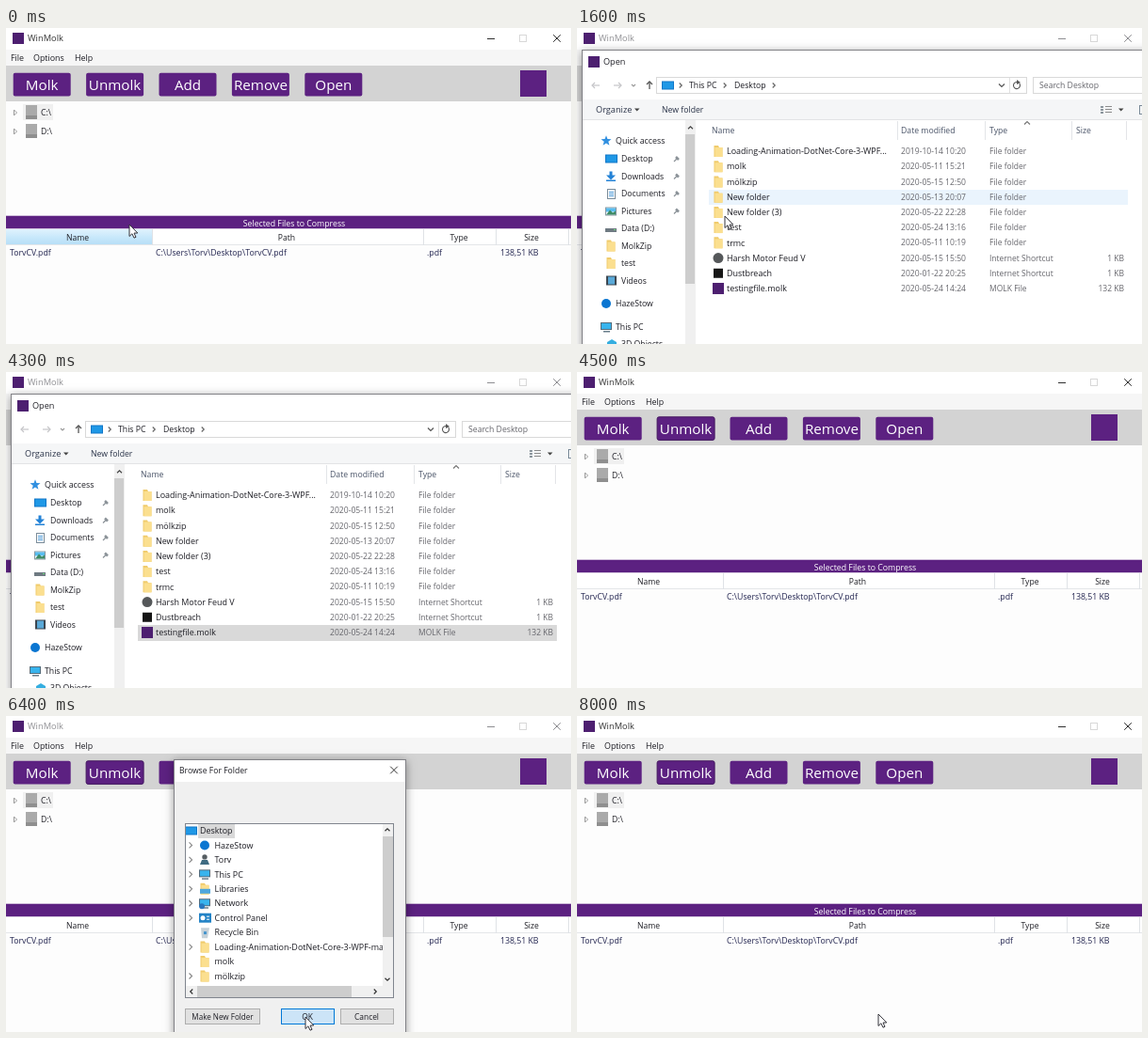
Recreate the animation shown at these times as an HTML page with a canvas. Size 600 px wide and 336 px high, loop 8.1 s.

```html
<!DOCTYPE html>
<html lang="en">
<head>
<meta charset="utf-8">
<title>Archive tool</title>
<style>
html, body { margin: 0; width: 100%; height: 100%; overflow: hidden; background: #fff; }
canvas { display: block; width: 600px; height: 336px; }
</style>
</head>
<body>
<canvas id="stage" width="600" height="336"></canvas>
<script>
const g = document.getElementById('stage').getContext('2d');
const LOOP = 8100, STEP = 100;
const PURPLE = '#5c2181', INK = '#1d1d24', NAVY = '#2a3348', GREY = '#66666c';
const T = { openIn: 900, select: 2300, blur: 3900, openOut: 4400, browseIn: 4700, press: 6300, browseOut: 6700 };

// time, x, y of the pointer tip
const PATH = [
  [0, 131, 209], [200, 127, 150], [500, 116, 64], [1200, 116, 64], [1300, 120, 75],
  [1600, 157, 200], [1800, 184, 248], [2100, 205, 278], [2800, 206, 281], [3000, 215, 285],
  [3500, 440, 350], [4900, 440, 350], [5300, 414, 323], [5800, 330, 321], [6000, 318, 320],
  [6800, 318, 320], [7200, 320, 317], [8100, 320, 317]
];

function pointer(t) {
  if (t <= 0) return { x: PATH[0][1], y: PATH[0][2] };
  const i = PATH.findIndex(p => p[0] > t);
  const [a, b] = [PATH[i - 1], PATH[i]];
  const u = (t - a[0]) / (b[0] - a[0]);
  return { x: a[1] + (b[1] - a[1]) * u, y: a[2] + (b[2] - a[2]) * u };
}

function box(x, y, w, h, fill, edge) {
  if (fill) { g.fillStyle = fill; g.fillRect(x, y, w, h); }
  if (edge) { g.strokeStyle = edge; g.lineWidth = 1; g.strokeRect(x + .5, y + .5, w - 1, h - 1); }
}

// dialog body with a soft drop shadow
function panel(x, y, w, h, fill) {
  g.save();
  g.shadowColor = 'rgba(0,0,0,.4)';
  g.shadowBlur = 9;
  g.shadowOffsetY = 2;
  box(x, y, w, h, fill);
  g.restore();
  box(x, y, w, h, null, '#828287');
}

function disc(x, y, r, fill) {
  g.fillStyle = fill;
  g.beginPath(); g.arc(x, y, r, 0, 7); g.fill();
}

function line(color, width, ...pts) {
  g.strokeStyle = color; g.lineWidth = width;
  g.beginPath();
  for (let i = 0; i < pts.length; i += 2) g.lineTo(pts[i], pts[i + 1]);
  g.stroke();
}

function poly(fill, ...pts) {
  g.fillStyle = fill;
  g.beginPath();
  for (let i = 0; i < pts.length; i += 2) g.lineTo(pts[i], pts[i + 1]);
  g.fill();
}

// y is the middle of the capitals
function text(s, x, y, color = INK, size = 8.7, align = 'left') {
  g.font = size + 'px "Open Sans", "Noto Sans", sans-serif';
  g.textAlign = align;
  g.fillStyle = color;
  g.fillText(s, x, y + size * .36);
}

function chevron(x, y, dir, color = '#666', r = 2.5) {
  const [dx, dy] = { right: [1, 0], left: [-1, 0], up: [0, -1], down: [0, 1] }[dir];
  const k = r / 2;
  line(color, 1.2, x - dx * k + dy * r, y - dy * k + dx * r, x + dx * k, y + dy * k, x - dx * k - dy * r, y - dy * k - dx * r);
}

function cross(x, y, r, color) {
  line(color, 1, x - r, y - r, x + r, y + r);
  line(color, 1, x + r, y - r, x - r, y + r);
}

const icons = {
  folder(x, y) {
    poly('#f0cb6c', x - 4.5, y - 6, x, y - 6, x + 1, y - 4, x + 4.5, y - 4, x + 4.5, y + 6, x - 4.5, y + 6);
    box(x - 3.5, y - 4, 8, 10, '#fbdf8f');
  },
  screen(x, y) {
    box(x - 6, y - 4.5, 13, 9, '#1277c8');
    box(x - 5, y - 3.5, 11, 7, '#1f98e6');
  },
  pc(x, y) {
    box(x - 6, y - 5, 12, 8, '#526b7b');
    box(x - 5, y - 4, 10, 6, '#38b4ed');
    box(x - 3, y + 4, 7, 1.5, '#6a7f8c');
  },
  star(x, y) {
    g.fillStyle = '#2f8fe0';
    g.beginPath();
    for (let i = 0; i < 10; i++) {
      const r = i % 2 ? 2.4 : 5.8, a = i * Math.PI / 5 - Math.PI / 2;
      g.lineTo(x + r * Math.cos(a), y + r * Math.sin(a));
    }
    g.fill();
  },
  down(x, y) {
    box(x - 1.5, y - 5, 3, 5, '#2382d6');
    poly('#2382d6', x - 5, y - 1, x + 5, y - 1, x, y + 4);
    box(x - 5, y + 4, 10, 1.5, '#2382d6');
  },
  page(x, y) {
    box(x - 4, y - 5, 9, 11, '#fff', '#7b8c99');
    for (let i = 0; i < 3; i++) box(x - 2, y - 2 + i * 2, 5, 1, '#4c9ad8');
  },
  picture(x, y) {
    box(x - 6, y - 4, 12, 9, '#fff', '#8395a0');
    box(x - 5, y - 3, 10, 4, '#58bdf0');
    poly('#3c8a65', x - 5, y + 4, x - 1, y - 1, x + 2, y + 2, x + 5, y, x + 5, y + 4);
  },
  drive(x, y) {
    box(x - 6, y, 12, 4, '#6f7a82');
    box(x + 3, y + 1, 2, 1, '#6fdc7d');
  },
  film(x, y) {
    box(x - 5, y - 5, 11, 10, '#3d4750');
    box(x - 3, y - 4, 7, 8, '#5aa9d8');
  },
  cube(x, y) {
    poly('#35aee0', x, y - 5, x + 5, y - 2, x + 5, y + 4, x, y + 6, x - 5, y + 4, x - 5, y - 2);
  },
  cloud(x, y) { disc(x, y, 5, '#0b76d1'); },
  user(x, y) {
    disc(x, y - 3, 2.7, '#555d62');
    poly('#3f6b82', x - 5, y + 5, x - 3, y, x + 3, y, x + 5, y + 5);
  },
  shelf(x, y) {
    icons.folder(x, y);
    box(x - 5, y, 11, 5, '#4ea7dc');
  },
  network(x, y) {
    icons.pc(x, y);
    disc(x - 3, y + 3, 3, '#2877be');
  },
  panel(x, y) {
    box(x - 6, y - 5, 13, 10, '#2383c6');
    disc(x - 2, y, 2.5, '#fff');
    box(x + 2, y - 2, 3, 1, '#fff');
    box(x + 2, y + 1, 3, 1, '#fff');
  },
  bin(x, y) {
    poly('#c6d1d8', x - 4, y - 5, x + 5, y - 5, x + 3, y + 6, x - 3, y + 6);
    box(x - 1, y - 1, 3, 3, '#4394cd');
  },
  app(x, y) { box(x - 6, y - 6, 12, 12, '#4d1f70'); },
  grey(x, y) { disc(x, y, 5.5, '#55585a'); },
  black(x, y) { box(x - 5, y - 5, 10, 10, '#161616'); }
};

function pin(x, y) {
  line('#8b9298', 1.2, x - 3, y + 3, x, y);
  line('#8b9298', 2.5, x - 1, y - 2, x + 2, y + 1);
}

function mainWindow(t, active, hover) {
  box(0, 0, 600, 336, '#fdfdfd');
  box(0, 0, 600, 23, '#fff');
  icons.app(13, 11);
  const ink = active ? '#303030' : '#8e8e92';
  text('WinMolk', 23, 11, ink, 9.3);
  box(511, 11, 8, 1, ink);
  box(545, 7, 8, 8, null, '#d8d8d8');
  cross(585, 11, 3.8, ink);

  box(0, 23, 600, 17, '#f6f6f6');
  text('File', 5, 32, INK, 8.9);
  text('Options', 29, 32, INK, 8.9);
  text('Help', 73, 32, INK, 8.9);

  box(0, 40, 600, 38, '#d3d3d3');
  ['Molk', 'Unmolk', 'Add', 'Remove', 'Open'].forEach((label, i) => {
    const x = 7.7 + i * 77.4;
    g.fillStyle = PURPLE;
    g.beginPath(); g.roundRect(x, 47.8, 61, 24.6, 2); g.fill();
    if (i === 1 && t >= 700) {
      g.strokeStyle = '#43175f'; g.lineWidth = 1; g.stroke();
    }
    text(label, x + 30.5, 61, '#fff', 15.2, 'center');
  });
  box(546, 45, 28, 28, PURPLE);

  box(18, 81, 32, 17, '#f0f0f0');
  ['C:\\', 'D:\\'].forEach((name, i) => {
    const y = 90 + i * 20;
    line('#9a9a9a', 1, 8.5, y - 3, 11.5, y, 8.5, y + 3, 8.5, y - 3);
    box(21, y - 8, 12, 15, '#aaa');
    box(21, y + 3, 12, 4, '#8f8f8f');
    text(name, 37, y);
  });

  box(0, 199.7, 600, 13.8, PURPLE);
  text('Selected Files to Compress', 306, 208, '#fff', 8.75, 'center');
  box(0, 213.5, 600, 17.5, '#fff');
  if (hover.y > 205 && hover.y < 232 && hover.x < 155) {
    const shade = g.createLinearGradient(0, 214, 0, 231);
    shade.addColorStop(0, '#e0f2fd');
    shade.addColorStop(.5, '#c8e8fb');
    shade.addColorStop(1, '#b5ddf6');
    box(0, 214, 155, 17, shade);
  }
  box(0, 230, 600, 1, '#e4e6e9');
  for (const x of [155, 443, 520, 597]) box(x, 214, 1, 17, '#dfe2e6');
  [['Name', 76], ['Path', 298], ['Type', 481], ['Size', 558]]
    .forEach(([s, x]) => text(s, x, 223, INK, 8.6, 'center'));
  [['TorvCV.pdf', 4], ['C:\\Users\\Torv\\Desktop\\TorvCV.pdf', 159], ['.pdf', 447], ['138,51 KB', 525]]
    .forEach(([s, x]) => text(s, x, 239, '#232550', 8.75));
}

const PLACES = [
  ['Desktop', 'screen'], ['Downloads', 'down'], ['Documents', 'page'], ['Pictures', 'picture'],
  ['Data (D:)', 'drive'], ['MolkZip', 'folder'], ['test', 'folder'], ['Videos', 'film']
];
const FILES = [
  ['Loading-Animation-DotNet-Core-3-WPF...', '2019-10-14 10:20'],
  ['molk', '2020-05-11 15:21'],
  ['mölkzip', '2020-05-15 12:50'],
  ['New folder', '2020-05-13 20:07'],
  ['New folder (3)', '2020-05-22 22:28'],
  ['test', '2020-05-24 13:16'],
  ['trmc', '2020-05-11 10:19'],
  ['Harsh Motor Feud V', '2020-05-15 15:50', 'Internet Shortcut', '1 KB', 'grey'],
  ['Dustbreach', '2020-01-22 20:25', 'Internet Shortcut', '1 KB', 'black'],
  ['testingfile.molk', '2020-05-24 14:24', 'MOLK File', '132 KB', 'app']
];

function openDialog(t, hover) {
  panel(5, 23, 610, 330, '#fff');
  icons.app(18, 36);
  text('Open', 28, 36, INK, 9.1);

  const arrow = (x, d, c) => {
    line(c, 1.2, x - 4, 61, x + 4, 61);
    line(c, 1.2, x + d, 58, x + d * 4, 61, x + d, 64);
  };
  arrow(20, -1, '#c5c5c8');
  arrow(43, 1, '#c5c5c8');
  chevron(60, 61, 'down', '#999', 2);
  line('#555', 1.3, 77, 65, 77, 57);
  line('#555', 1.3, 74, 60, 77, 57, 80, 60);

  box(84, 52, 394, 18, '#fff', '#d9d9d9');
  icons.screen(96, 61);
  chevron(110, 61, 'right');
  text('This PC', 119, 61);
  chevron(157, 61, 'right');
  text('Desktop', 167, 61);
  chevron(209, 61, 'right');
  chevron(451, 61, 'down', '#555', 3);
  box(459, 53, 1, 16, '#e0e0e0');
  g.strokeStyle = '#555'; g.lineWidth = 1.1;
  g.beginPath(); g.arc(467, 61, 3.5, -.6, 4.8); g.stroke();
  poly('#555', 467, 55, 471, 58, 467, 60);
  box(484, 52, 130, 18, '#fff', '#d9d9d9');
  text('Search Desktop', 491, 61, GREY);

  box(6, 76, 600, 21, '#f5f6f7');
  box(6, 97, 600, 1, '#e2e3e5');
  text('Organize', 20, 87, NAVY, 9.2);
  poly('#444', 61, 85.5, 66.5, 85.5, 63.7, 88.5);
  text('New folder', 90, 87, NAVY);
  for (let i = 0; i < 3; i++) {
    box(556, 83 + i * 3, 3, 2, '#8b959c');
    box(561, 83 + i * 3, 7, 1, '#8b8b8b');
  }
  poly('#444', 575, 85.5, 580.5, 85.5, 577.7, 88.5);
  box(597, 82, 5, 10, null, '#7a8a98');

  icons.star(31, 120);
  text('Quick access', 41, 120, INK, 8.85);
  PLACES.forEach(([name, icon], i) => {
    const y = 139 + i * 18.5;
    icons[icon](36, y);
    text(name, 47, y);
    if (i < 4) pin(106, y);
  });
  icons.cloud(31, 293);
  text('HazeStow', 41, 293);
  icons.pc(31, 318);
  text('This PC', 41, 318);
  icons.cube(37, 336);
  text('3D Objects', 47, 336);
  box(115, 98, 11, 238, '#f0f0f0');
  chevron(120.5, 106, 'up', '#444');
  box(115, 113, 10, 159, '#cdcdcd');

  [['Name', 143], ['Date modified', 344], ['Type', 438], ['Size', 530]]
    .forEach(([s, x]) => text(s, x, 109, '#4a5468'));
  for (const x of [340, 433, 525, 583]) box(x, 99, 1, 20, '#e3e5e8');
  chevron(478, 101, 'up', '#777', 3);

  FILES.forEach(([name, date, type = 'File folder', size, icon = 'folder'], i) => {
    const y = 131 + i * 16.22, top = Math.round(y - 8);
    const over = hover.x > 140 && hover.x < 585 && Math.abs(hover.y - y) < 8.1;
    if (i === 9 && t >= T.blur) box(140, top, 445, 17, '#d9d9d9');
    else if (i === 9 && t >= T.select) box(140, top, 445, 17, '#cce8ff', '#9ad2fb');
    else if (over) box(140, top, 445, 16, '#eaf4fd');
    icons[icon](150, y);
    text(name, 159, y, INK, 8.95);
    text(date, 344, y, GREY, 8.6);
    text(type, 438, y, GREY, 8.5);
    if (size) text(size, 581, y, GREY, 8.5, 'right');
  });
}

const TREE = [
  ['Desktop', 'screen'], ['HazeStow', 'cloud'], ['Torv', 'user'], ['This PC', 'pc'], ['Libraries', 'shelf'],
  ['Network', 'network'], ['Control Panel', 'panel'], ['Recycle Bin', 'bin'],
  ['Loading-Animation-DotNet-Core-3-WPF-master', 'folder'], ['molk', 'folder'], ['mölkzip', 'folder']
];

function browseDialog(t, at) {
  panel(178, 46, 247, 300, '#f0f0f0');
  box(179, 47, 245, 23, '#fff');
  text('Browse For Folder', 184, 58, INK, 8.6);
  cross(412, 57.5, 3.8, '#333');

  box(190, 114, 222, 186, '#fff', '#80858e');
  g.save();
  g.beginPath(); g.rect(191, 115, 209, 172); g.clip();
  box(204, 114, 39, 16, t >= T.press ? '#d9d9d9' : '#cce8ff');
  TREE.forEach(([name, icon], i) => {
    const y = 122 + i * 15.45;
    icons[icon](i ? 211 : 196, y);
    if (i && i !== 7 && i < 9 || i === 10) chevron(196, y, 'right', '#888', 3);
    text(name, i ? 221.5 : 206, y, INK, 8.95);
  });
  g.restore();
  box(400, 115, 11, 172, '#f0f0f0');
  box(400, 128, 11, 107, '#cdcdcd');
  chevron(405, 121, 'up', '#333');
  chevron(405, 280, 'down', '#333');
  box(191, 287, 220, 12, '#f0f0f0');
  box(203, 287, 164, 12, '#cdcdcd');
  chevron(197, 293, 'left', '#333');
  chevron(392, 293, 'right', '#333');

  const over = at.x > 292 && at.x < 349 && at.y > 311 && at.y < 328;
  const held = t >= T.press && t < T.press + 300;
  box(190, 311, 80, 17, '#e1e1e1', '#adadad');
  text('Make New Folder', 230, 320, INK, 8.1, 'center');
  box(292, 311, 57, 17, held ? '#cce4f7' : over ? '#e5f1fb' : '#e1e1e1', '#0078d7');
  if (!over) box(293, 312, 55, 15, null, '#0078d7');
  text('OK', 320, 320, INK, 8.4, 'center');
  box(355, 311, 57, 17, '#e1e1e1', '#adadad');
  text('Cancel', 383, 320, INK, 8.4, 'center');
}

function drawPointer({ x, y }) {
  const pts = [0, 0, 0, 12.5, 2.9, 9.8, 5, 14.2, 7, 13.3, 5, 9.1, 8.8, 9];
  g.save();
  g.translate(x, y);
  poly('#fff', ...pts);
  line('#33333a', 1, ...pts, 0, 0);
  g.restore();
}

function draw(t) {
  const at = pointer(t), hover = pointer(t - 60);
  const opening = t >= T.openIn && t < T.openOut;
  const browsing = t >= T.browseIn && t < T.browseOut;
  mainWindow(t, !opening && !browsing, hover);
  if (opening) openDialog(t, hover);
  if (browsing) browseDialog(t, at);
  drawPointer(at);
}

const start = performance.now();
function tick() {
  const t = (performance.now() - start) % LOOP;
  draw(Math.floor(t / STEP) * STEP);
  requestAnimationFrame(tick);
}
tick();
</script>
</body>
</html>
```
